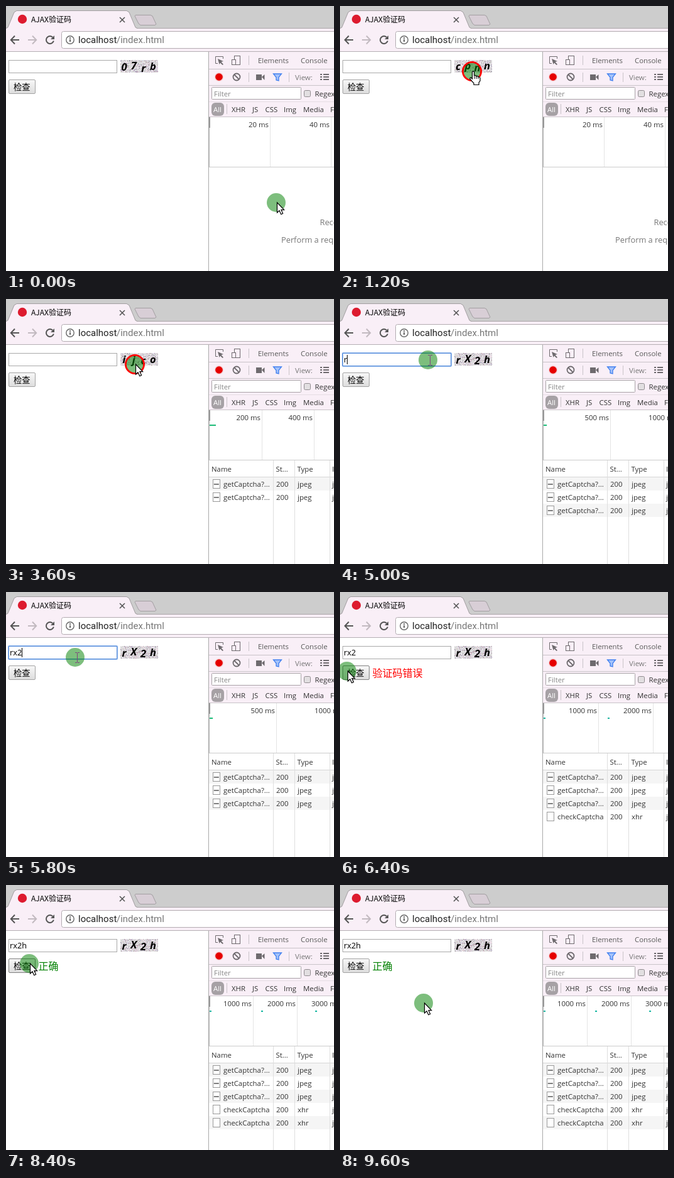
An HTML page with a canvas for the animation above (9800 ms loop, 522x422 px).

```html
<!DOCTYPE html>
<html lang="zh">
<head>
<meta charset="utf-8">
<title>AJAX验证码</title>
<style>
  html, body { margin: 0; width: 100%; height: 100%; overflow: hidden; background: #fff; }
  canvas { display: block; width: 522px; height: 422px; }
</style>
</head>
<body>
<canvas id="stage" width="522" height="422"></canvas>
<script>
const ctx = document.getElementById('stage').getContext('2d');
const LOOP = 9800, STEP = 200;
const UI = '"Open Sans", "Noto Sans", sans-serif';
const CJK = '"Noto Sans CJK SC", "Noto Sans CJK", sans-serif';
const PINK = '#f9eff7', LINE = '#c9c3c8', ICON = '#6e6a6e';

// Cues: [step, value...]; each holds until the next one.
const POINTER = [
  [0, 430, 313, 'arrow'], [1, 424, 300, 'arrow'], [2, 390, 255, 'arrow'],
  [3, 330, 190, 'arrow'], [4, 260, 135, 'arrow'], [5, 216, 108, 'hand'],
  [6, 210, 104, 'hand', 1], [7, 210, 104, 'hand'], [10, 207, 104, 'hand'],
  [11, 205, 104, 'hand', 1], [12, 205, 104, 'hand'], [18, 205, 104, 'arrow', 1],
  [19, 205, 104, 'arrow'], [20, 190, 101, 'arrow'], [21, 160, 97, 'arrow'],
  [22, 140, 97, 'arrow', 1], [23, 140, 97, 'arrow'], [24, 140, 97, 'beam'],
  [29, 110, 104, 'beam'], [30, 50, 117, 'arrow'], [31, 11, 126, 'arrow', 1],
  [32, 11, 126, 'arrow'], [33, 16, 122, 'arrow'], [34, 40, 112, 'arrow'],
  [35, 60, 103, 'beam', 1], [36, 60, 103, 'beam'], [39, 55, 106, 'beam'],
  [40, 42, 118, 'arrow'], [41, 37, 125, 'arrow', 1], [42, 37, 125, 'arrow'],
  [43, 44, 142, 'arrow'], [44, 59, 174, 'arrow'], [47, 95, 180, 'arrow'],
  [48, 133, 188, 'arrow']
];
const CODE = [[0, '07rb'], [6, 'cpnn'], [11, 'ijco'], [19, 'rX2h']];
const TYPED = [[0, ''], [25, 'r'], [27, 'rx'], [28, 'rx2'], [37, 'rx2h']];
const FOCUS = [[0, false], [22, true], [31, false], [35, true], [41, false]];
const ROWS = [[0, 0], [7, 1], [12, 2], [20, 3], [32, 4], [42, 5]];
const RESULT = [[0, '', ''], [32, '验证码错误', '#f00'], [42, '正确', '#008000']];
// Time scale per row count: milliseconds per tick, pixels per tick.
const SCALE = [[20, 97], [5, 97], [200, 83.5], [500, 107.3], [1000, 87.7], [1000, 70]];
const REQUESTS = [0, 1165, 2400];
// Baselines of the four captcha letters.
const BASE = { '07rb': [103, 101, 105, 102], cpnn: [102, 101, 104, 101],
  ijco: [102, 103, 104, 102], rX2h: [103, 101, 104, 102] };

const at = (cues, k) => cues.reduce((hit, c) => c[0] <= k ? c : hit).slice(1);

function box(x, y, w, h, color) {
  ctx.fillStyle = color;
  ctx.fillRect(x, y, w, h);
}

function frame(x, y, w, h, color) {
  ctx.strokeStyle = color;
  ctx.lineWidth = 1;
  ctx.strokeRect(x + .5, y + .5, w - 1, h - 1);
}

function text(s, x, y, size = 11.4, color = '#333', font = UI, align = 'left') {
  ctx.font = size + 'px ' + font;
  ctx.textAlign = align;
  ctx.fillStyle = color;
  ctx.fillText(s, x, y);
}

function shape(points, fill, stroke, width = 1, open = false) {
  ctx.beginPath();
  for (let i = 0; i < points.length; i += 2) ctx.lineTo(points[i], points[i + 1]);
  if (!open) ctx.closePath();
  if (fill) { ctx.fillStyle = fill; ctx.fill(); }
  if (stroke) { ctx.strokeStyle = stroke; ctx.lineWidth = width; ctx.stroke(); }
}

const line = (points, color, width = 1) => shape(points, null, color, width, true);

function disc(x, y, r, fill, stroke, width = 1) {
  ctx.beginPath();
  ctx.arc(x, y, r, 0, 7);
  if (fill) { ctx.fillStyle = fill; ctx.fill(); }
  if (stroke) { ctx.strokeStyle = stroke; ctx.lineWidth = width; ctx.stroke(); }
}

function pill(x, y, w, h, r, fill, stroke) {
  ctx.beginPath();
  ctx.roundRect(x, y, w, h, r);
  ctx.fillStyle = fill;
  ctx.fill();
  if (stroke) { ctx.strokeStyle = stroke; ctx.lineWidth = 1; ctx.stroke(); }
}

function browser() {
  box(0, 0, 522, 36, '#cdcdcd');
  box(0, 36, 522, 36, PINK);
  box(0, 35, 522, 1, '#aaa6a9');
  shape([0, 36, 3, 34, 13, 10, 17, 7.5, 192, 7.5, 196, 10, 206, 34, 209, 36], PINK);
  line([0, 35.5, 3, 34, 13, 10, 17, 7.5, 192, 7.5, 196, 10, 206, 34, 209, 35.5], '#a39fa2');
  shape([206, 14.5, 230, 14.5, 233, 16, 239, 29, 237, 30.5, 214, 30.5, 211, 28, 205, 16],
    '#d8ced6', '#a39fa2');
  disc(26, 21, 7.2, '#dd1b2f');
  text('AJAX验证码', 40, 26, 12, '#000', CJK);
  line([181, 18, 189, 26], '#555', 1.6);
  line([189, 18, 181, 26], '#555', 1.6);

  line([21, 54, 8, 54], '#555', 2);
  line([14, 47.5, 7.8, 54, 14, 60.5], '#555', 2);
  line([35, 54, 48, 54], '#c2bac0', 2);
  line([42, 47.5, 48.2, 54, 42, 60.5], '#c2bac0', 2);
  ctx.beginPath();
  ctx.arc(70, 54, 6, .25, 5.5);
  ctx.strokeStyle = '#555';
  ctx.lineWidth = 2;
  ctx.stroke();
  shape([77, 47, 77, 53, 71, 53], '#555');

  pill(88.5, 40.5, 450, 27, 3, '#fff', '#b3abb1');
  disc(102, 54, 6.2, null, '#666', 1.4);
  box(101, 53, 2, 4, '#666');
  box(101, 50, 2, 2, '#666');
  text('localhost', 115, 59, 15, '#222', 'Roboto, sans-serif');
  text('/index.html', 176, 59, 15, '#777', 'Roboto, sans-serif');
  box(0, 72, 522, 1, '#b5aeb3');
}

function captcha(code) {
  let seed = code.charCodeAt(0) * 97 + code.charCodeAt(1);
  const rnd = n => (seed = (seed * 16807) % 2147483647) % n;
  box(182, 86, 60, 20, '#dcdcdc');
  for (let i = 0; i < 500; i++) {
    const x = 182 + rnd(60), y = 86 + rnd(20), v = 125 + rnd(130);
    box(x, y, 1, 1, `rgb(${v + rnd(40)},${v},${v + rnd(40)})`);
  }
  [...code].forEach((c, i) =>
    text(c, 188 + i * 15.3, BASE[code][i], 16.5, '#000', UI, 'center', 'italic bold '));
}

function page(k) {
  const [typed] = at(TYPED, k), [focus] = at(FOCUS, k), [msg, color] = at(RESULT, k);
  const [px, py] = at(POINTER, k);
  if (focus) pill(3.5, 85.5, 174, 22, 1, '#fff', '#8db4ea');
  box(4, 86, 173, 21, '#fff');
  frame(4, 86, 173, 21, focus ? '#5a8fdc' : '#a9a9a9');
  text(typed, 6, 101, 12.8, '#000');
  if (focus) box(Math.round(6 + ctx.measureText(typed).width), 89, 1, 15, '#000');

  const code = at(CODE, k)[0];
  captcha(code);

  const hover = px > 4 && px < 47 && py > 117 && py < 140;
  const g = ctx.createLinearGradient(0, 117, 0, 140);
  g.addColorStop(0, '#f8f8f8');
  g.addColorStop(1, '#dcdcdc');
  pill(4.5, 117.5, 42, 22, 1.5, g, hover ? '#808080' : '#a3a3a3');
  text('检查', 12, 134, 13.33, '#000', CJK);
  text(msg, 51.5, 134.5, 16, color, CJK);
}

function toolbars() {
  box(322, 73, 1, 349, '#aaa');
  box(323, 73, 199, 103, PINK);
  [100, 126, 176].forEach(y => box(323, y, 199, 1, LINE));
  box(323, 152, 199, 1, '#e6dde4');

  line([337, 91.5, 333.5, 91.5, 333.5, 80.5, 345.5, 80.5, 345.5, 84], ICON);
  shape([337, 84, 346, 88, 342.5, 89, 346, 93, 344.5, 94, 341, 90.5, 339.5, 93], ICON);
  frame(363, 79, 10, 15, ICON);
  box(359, 85, 7, 9, PINK);
  frame(359, 85, 7, 9, ICON);
  box(386, 79, 1, 15, LINE);
  text('Elements', 401, 91, 11.4, '#5a5a5a');
  text('Console', 469, 91, 11.4, '#5a5a5a');

  disc(339, 113, 7, '#f3c9cd');
  disc(339, 113, 5.8, '#e60000');
  disc(367, 113, 5.5, null, ICON, 1.8);
  line([363, 109, 371, 117], ICON, 1.8);
  box(386, 106, 1, 15, LINE);
  box(398, 109, 9, 9, ICON);
  shape([407, 113, 411.5, 109, 411.5, 118], ICON);
  shape([425.5, 108, 438.5, 108, 434, 113.5, 434, 119, 430, 118, 430, 113.5],
    '#a5c3fa', '#3f7ff0', 1.3);
  box(450, 106, 1, 15, LINE);
  text('View:', 460, 117.5, 11.4, '#777');
  for (let y = 108; y < 119; y += 4) {
    box(500, y, 3, 2, ICON);
    box(505, y, 9, 2, ICON);
  }

  pill(327.5, 129.5, 142, 19, 1, '#fff', '#a9a2a7');
  text('Filter', 331, 143.5, 11.4, '#888');
  pill(474.5, 134.5, 10, 10, 2, '#e2dfe1', '#8f8a8e');
  text('Regex', 491.5, 143.5);

  pill(327, 154, 20, 21, 6, '#a6a1a5');
  text('All', 330, 169, 11.4, '#fff');
  box(351, 156, 1, 16, LINE);
  [['XHR', 359], ['JS', 392], ['CSS', 412.5], ['Img', 442], ['Media', 473], ['Font', 516]]
    .forEach(([s, x]) => text(s, x, 169));
}

function timeline(rows) {
  const [unit, gap] = SCALE[rows];
  box(323, 177, 199, 79, '#fff');
  for (let i = 1; i < 4; i++) {
    const x = Math.round(323 + i * gap);
    box(x, 177, 1, 79, '#e4e4e4');
    text(i * unit + ' ms', x - 2, 193, 11.4, '#333', UI, 'right');
  }
  REQUESTS.slice(0, rows).forEach(ms => {
    const x = Math.round(324 + ms * gap / unit);
    box(x, 200, Math.max(3, 24 * gap / unit), 2, rows > 3 ? '#12b5a0' : '#1dbb78');
  });
  box(323, 177, 1, 79, '#bbb');
  box(323, 177, 2, 17, '#999');
  box(323, 256, 199, 1, '#ccc');
}

function table(rows) {
  if (!rows) {
    text('Recording network activity', 499.5, 349, 12.8, '#777');
    text('Perform a request', 438, 377, 12.8, '#777');
    return;
  }
  for (let i = 0; i < rows; i += 2) box(323, 284 + i * 21, 199, 21, '#f5f5f5');
  box(323, 283, 199, 1, '#d6d6d6');
  [425, 459, 515].forEach(x => box(x, 257, 1, 165, '#dedede'));
  [['Name', 327], ['St...', 429.5], ['Type', 463.5], ['Initiator', 519]]
    .forEach(([s, x]) => text(s, x, 275));
  for (let i = 0; i < rows; i++) {
    const y = 284 + i * 21, image = i < 3;
    box(329, y + 3, 12, 15, '#fff');
    frame(329, y + 3, 12, 15, '#9a9a9a');
    if (image) for (let x = 331; x < 339; x += 2) box(x, y + 10, 1.5, 2, '#555');
    text(image ? 'getCaptcha?...' : 'checkCaptcha', 346, y + 14.5);
    text('200', 430, y + 14.5);
    text(image ? 'jpeg' : 'xhr', 464, y + 14.5);
    text('jquery', 519, y + 14.5);
  }
}

const CURSORS = {
  arrow() {
    shape([.5, 0, .5, 16, 4, 12.7, 6.8, 18.8, 9.6, 17.5, 7, 11.7, 11.6, 11.7], '#fff', '#000', 1.2);
  },
  hand() {
    shape([-.5, 1, 1, -.5, 2.5, 1, 2.5, 7, 5, 6.5, 6, 8, 8, 7.5, 9, 9, 11, 9, 12, 11, 12, 15,
      10, 18, 10, 21.5, 2, 21.5, 2, 19, -4, 12.5, -4, 10.5, -2.5, 10, -.5, 12], '#fff', '#000', 1.2);
    [3, 6, 9].forEach(x => box(x - .5, 8, 1, 4, '#000'));
  },
  beam() {
    const c = '#80427f';
    box(2, -7, 1, 15, c);
    [-8, 8].forEach(y => { box(-1, y, 3, 1, c); box(3, y, 3, 1, c); });
  }
};

function pointer(k) {
  const [x, y, kind, pressed] = at(POINTER, k);
  disc(x, y, 15, 'rgba(0,128,0,.51)');
  if (pressed) disc(x, y, 14.6, null, '#f00', 2.8);
  ctx.save();
  ctx.translate(x + 1, y);
  CURSORS[kind]();
  ctx.restore();
}

function draw(now) {
  const k = Math.floor(now % LOOP / STEP), [rows] = at(ROWS, k);
  box(0, 0, 522, 422, '#fff');
  browser();
  page(k);
  toolbars();
  timeline(rows);
  table(rows);
  pointer(k);
}

// Adds an optional style prefix such as "italic bold ".
function text(s, x, y, size = 11.4, color = '#333', font = UI, align = 'left', style = '') {
  ctx.font = style + size + 'px ' + font;
  ctx.textAlign = align;
  ctx.fillStyle = color;
  ctx.fillText(s, x, y);
}

const start = performance.now();
function tick() {
  draw(performance.now() - start);
  requestAnimationFrame(tick);
}
tick();
</script>
</body>
</html>
```
